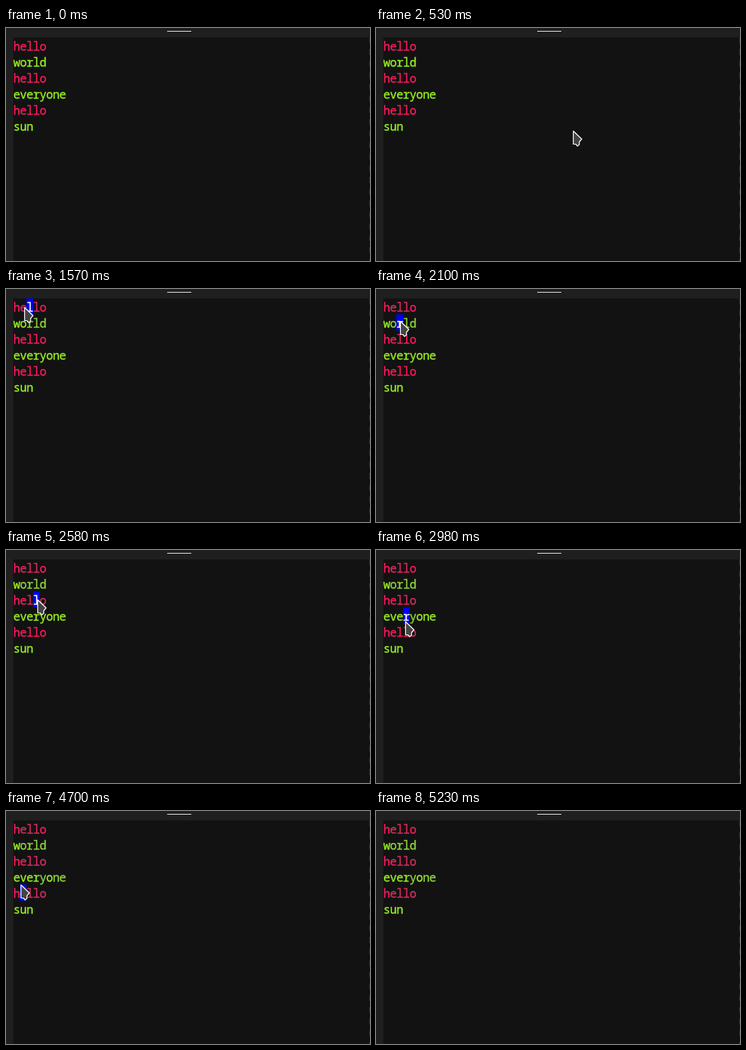
Animation of 499x320 px, one loop 6.09 s. Source, as an HTML page with a canvas:

```html
<!DOCTYPE html>
<html lang="en">
<head>
<meta charset="utf-8">
<style>
  html, body { margin: 0; height: 100%; overflow: hidden; background: #1f1f1f; }
  canvas { display: block; }
</style>
</head>
<body>
<canvas id="stage" width="499" height="320"></canvas>
<script>
const ctx = document.getElementById('stage').getContext('2d');
const LOOP = 6090, STEP = 40;
const LEFT = 10, TOP = 13, CELL_W = 9, CELL_H = 22;
const LINES = ['hello', 'world', 'hello', 'everyone', 'hello', 'sun'];
const BRIGHT = ['#fc1a5c', '#98ee22'], MUTED = ['#d62c60', '#8ed43c'];
const pointerShape = new Path2D('M.5 .5L12 11.5L8.7 15.5V19L6 21.2L3.8 18.5H.5Z');

// Pointer moves: start, end, target, optional curve control and easing.
// The highlight trails one step behind and settles at the end time.
const MOVES = [
  { start: 210, end: 810, to: [143, 106], via: [300, 222] },
  { start: 850, end: 1290, to: [37, 28], ease: p => 1 - (1 - p) ** 3.5 },
  { start: 1450, end: 1690, to: [15, 23], via: [33, 26] },
  { start: 2020, end: 2140, to: [33, 44] },
  { start: 2300, end: 2300, to: [31.5, 47] },
  { start: 2460, end: 2740, to: [44.4, 84], via: [46.4, 65.2] },
  { start: 2900, end: 2980, to: [40, 98] },
  { start: 3190, end: 3350, to: [62.7, 94] },
  { start: 3560, end: 3560, to: [67, 86] },
  { start: 4300, end: 4420, to: [52, 97], via: [62, 101.5] },
  { start: 4580, end: 4700, to: [20, 101] },
  { start: 4950, end: 5270, to: [530, -11], ease: p => p ** 3 },
];

function pointerAt(t) {
  if (t < MOVES[0].start) return [-99, -99];
  let from = [466, -25];
  for (const { start, end, to, via, ease = p => p } of MOVES) {
    if (t < start) break;
    const steps = Math.max(1, (end - start) / STEP);
    const p = ease(Math.min(1, (Math.floor((t - start) / STEP) + 1) / steps));
    from = from.map((a, i) => {
      const mid = via ? via[i] : (a + to[i]) / 2;
      return (1 - p) ** 2 * a + 2 * p * (1 - p) * mid + p * p * to[i];
    });
  }
  return from;
}

// When the pointer first passes over each letter
const touched = LINES.map((line, row) => [...line].map((_, col) => {
  const x = LEFT + col * CELL_W, y = TOP + row * CELL_H;
  for (let t = 0; t < LOOP; t += 10) {
    const [px, py] = pointerAt(t);
    if (px < x + 5 && px + 9 > x && py < y + 14 && py + 17 > y + 5) return t + 80;
  }
  return LOOP;
}));

function drawText(t) {
  const [hx, hy] = pointerAt(t - STEP);
  const hotCol = Math.floor((hx + 1.5 - LEFT) / CELL_W);
  const hotRow = Math.floor((hy - TOP) / CELL_H);
  ctx.font = '16px "Noto Sans Mono", monospace';
  ctx.lineWidth = 0.35;
  LINES.forEach((line, row) => [...line].forEach((letter, col) => {
    const x = LEFT + col * CELL_W, y = TOP + row * CELL_H;
    const hot = row === hotRow && col === hotCol;
    if (hot) {
      ctx.fillStyle = '#00f';
      ctx.fillRect(x, y, CELL_W, CELL_H);
    }
    const palette = t > touched[row][col] ? MUTED : BRIGHT;
    ctx.fillStyle = ctx.strokeStyle = hot ? '#fff' : palette[row % 2];
    ctx.fillText(letter, x, y + 18);
    ctx.strokeText(letter, x, y + 18);
  }));
}

function drawPointer([x, y]) {
  ctx.save();
  ctx.translate(Math.round(x), Math.round(y));
  ctx.fillStyle = '#444';
  ctx.strokeStyle = '#fff';
  ctx.lineWidth = 1.2;
  ctx.lineJoin = 'round';
  ctx.fill(pointerShape);
  ctx.stroke(pointerShape);
  ctx.restore();
}

function draw(now) {
  const t = now % LOOP;
  ctx.fillStyle = '#1f1f1f';
  ctx.fillRect(0, 0, 499, 320);
  ctx.fillStyle = '#121212';
  ctx.fillRect(LEFT, TOP, 489, 307);
  ctx.fillStyle = '#e4e4e4';
  ctx.fillRect(221, 4, 33, 1);
  ctx.fillStyle = '#333';
  for (let y = 13; y < 320; y += 16) ctx.fillRect(498, y, 1, 8);
  drawText(t);
  drawPointer(pointerAt(t));
  requestAnimationFrame(draw);
}
requestAnimationFrame(draw);
</script>
</body>
</html>
```
